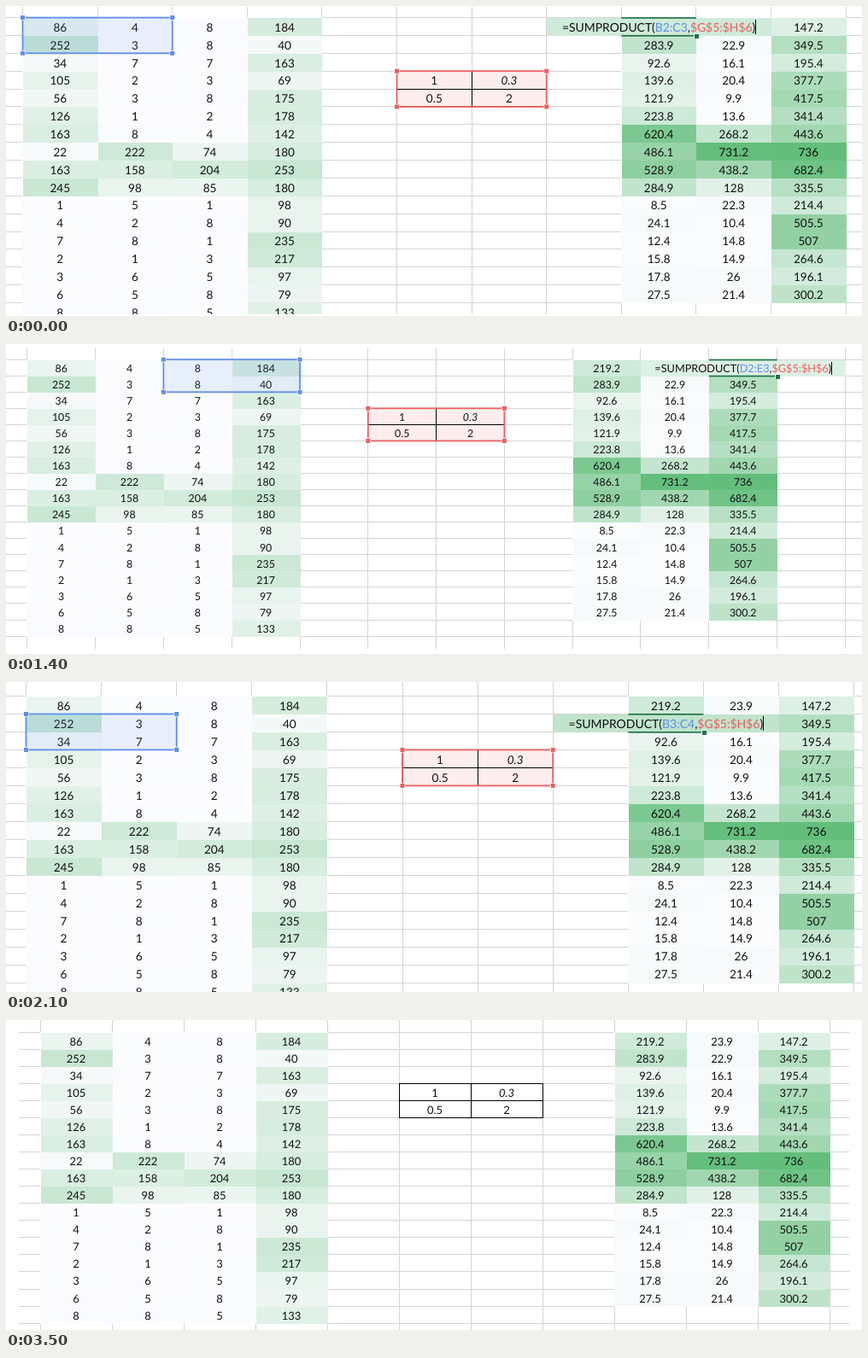
An HTML page with a canvas for the animation above (4.2 s loop, 1002 by 363 pixels).

```html
<!DOCTYPE html>
<html lang="en">
<head>
<meta charset="utf-8">
<title>Sliding SUMPRODUCT</title>
<style>
html, body { margin: 0; width: 100%; height: 100%; overflow: hidden; background: #fff; }
canvas { display: block; }
</style>
</head>
<body>
<canvas id="stage" width="1002" height="363"></canvas>
<script>
const ctx = document.getElementById('stage').getContext('2d');
const W = 1002, H = 363, STEP = 700;
const BLUE = '#5f8ced', RED = '#eb5e60', GREEN = '#217346', INK = '#111', GRID = '#d4d4d4';
const FONT = 'Lato, Carlito, sans-serif';

const columns = [
  [86, 252, 34, 105, 56, 126, 163, 22, 163, 245, 1, 4, 7, 2, 3, 6, 8],
  [4, 3, 7, 2, 3, 1, 8, 222, 158, 98, 5, 2, 8, 1, 6, 5, 8],
  [8, 8, 7, 3, 8, 2, 4, 74, 204, 85, 1, 8, 1, 3, 5, 8, 5],
  [184, 40, 163, 69, 175, 178, 142, 180, 253, 180, 98, 90, 235, 217, 97, 79, 133]
];
const kernel = [[1, 0.3], [0.5, 2]];
const KX = 5, KY = 3, OUT = 8;   // grid positions of the kernel and the results

// Grid origin, cell size and visible area of each step
const views = [
  { x: 19.5, y: 13.6, w: 87.6, h: 20.87, clip: [0, 1, W, 361] },
  { x: 19, y: 12.4, w: 87.15, h: 20.78, clip: [0, 1, W, 362] },
  { x: 24.8, y: 18.2, w: 79.8, h: 19.05, clip: [0, 5, W, 357] },
  { x: 23.5, y: 16.5, w: 88.1, h: 20.98, clip: [0, 0, W, H] },
  { x: 50.6, y: 13.5, w: 82.2, h: 19.58, clip: [28, 0, 974, H], bars: '#000' },
  { x: 40, y: 14.7, w: 84, h: 20.02, clip: [15, 0, 987, H] }
];

function convolve(c, r) {
  let sum = 0;
  kernel.forEach((row, j) => row.forEach((k, i) => sum += k * columns[c + i][r + j]));
  return Math.round(sum * 10) / 10;
}

function shade(v) {
  const t = v / 736;
  const mix = (a, b) => Math.round(a + (b - a) * t);
  return `rgb(${mix(252, 99)},${mix(252, 190)},${mix(255, 123)})`;
}

function draw(step) {
  const v = views[step];
  const gx = c => v.x + c * v.w;
  const gy = r => v.y + r * v.h;
  // First pixel after the grid line
  const px = c => Math.floor(gx(c)) + 1;
  const py = r => Math.floor(gy(r)) + 1;
  const base = r => gy(r + 0.775);

  function rect(x0, y0, x1, y1, color) {
    ctx.fillStyle = color;
    ctx.fillRect(x0, y0, x1 - x0, y1 - y0);
  }
  const fill = (c, r, cols, rows, color, edge = 0) =>
    rect(px(c) - edge, py(r) - edge, px(c + cols), py(r + rows), color);
  const hline = (c0, c1, r, color) => rect(px(c0) - 1, py(r) - 1, px(c1), py(r), color);
  const vline = (c, r0, r1, color) => rect(px(c) - 1, py(r0) - 1, px(c), py(r1), color);

  function label(text, c, r, style = '') {
    ctx.font = `${style} ${v.h * 0.65}px ${FONT}`;
    ctx.textAlign = 'center';
    ctx.fillStyle = INK;
    ctx.fillText(text, gx(c + 0.5), base(r));
  }

  function cell(value, c, r) {
    fill(c, r, 1, 1, shade(value));
    label(value, c, r);
  }

  function range(c, r, color) {
    ctx.strokeStyle = color;
    ctx.lineWidth = 1.8;
    ctx.strokeRect(gx(c), gy(r), 2 * v.w, 2 * v.h);
    for (const x of [gx(c), gx(c + 2)])
      for (const y of [gy(r), gy(r + 2)]) {
        rect(x - 3.2, y - 3.2, x + 3.2, y + 3.2, '#fff');
        rect(x - 2.5, y - 2.5, x + 2.5, y + 2.5, color);
      }
  }

  function editor(c, r) {
    const col = OUT + c, name = i => 'BCDE'[i];
    fill(col - 1, r, 3, 1, shade(convolve(c, r)));
    for (const y of [gy(r), gy(r + 1)])
      rect(gx(col), y - 0.5, gx(col + 1), y + 1.2, GREEN);
    const hx = px(col + 1), hy = py(r + 1);
    rect(hx - 3, hy - 3, hx + 3, hy + 3, '#fff');
    rect(hx - 2, hy - 2, hx + 3, hy + 3, GREEN);

    const parts = [
      ['=SUMPRODUCT(', INK],
      [`${name(c)}${r + 2}:${name(c + 1)}${r + 3}`, BLUE],
      [',', INK],
      ['$G$5:$H$6', RED],
      [')', INK]
    ];
    ctx.font = `${v.h * 0.667}px ${FONT}`;
    ctx.textAlign = 'left';
    const widths = parts.map(p => ctx.measureText(p[0]).width);
    let x = gx(col + 0.5) - widths.reduce((a, b) => a + b) / 2;
    parts.forEach(([text, color], i) => {
      ctx.fillStyle = color;
      ctx.fillText(text, x, base(r));
      x += widths[i];
    });
    rect(Math.round(x), py(r) + 2, Math.round(x) + 1, py(r + 1) - 2, '#000');
  }

  rect(0, 0, W, H, v.bars || '#fff');
  ctx.save();
  const [l, t, right, b] = v.clip;
  ctx.beginPath();
  ctx.rect(l, t, right - l, b - t);
  ctx.clip();
  rect(0, 0, W, H, '#fff');

  for (let c = 0; c < 13; c++) vline(c, -1, 19, GRID);
  for (let r = 0; r < 19; r++) hline(-1, 13, r, GRID);

  fill(0, 0, 4, 17, shade(0), 1);
  fill(OUT, 0, 3, 16, shade(0), 1);
  columns.forEach((list, c) => list.forEach((n, r) => cell(n, c, r)));
  for (let c = 0; c < 3; c++)
    for (let r = 0; r < 16; r++) cell(convolve(c, r), OUT + c, r);

  const editing = step < 5;
  fill(KX, KY, 2, 2, editing ? '#fdeeed' : '#fff');
  for (let i = 0; i < 3; i++) {
    hline(KX, KX + 2, KY + i, '#000');
    vline(KX + i, KY, KY + 2, '#000');
  }
  kernel.forEach((row, j) => row.forEach((k, i) =>
    label(k, KX + i, KY + j, k === 0.3 ? 'italic' : '')));

  if (editing) {
    const c = step % 3, r = Math.floor(step / 3);
    range(KX, KY, RED);
    fill(c, r, 2, 2, 'rgba(95,140,237,0.12)');
    range(c, r, BLUE);
    editor(c, r);
  }
  ctx.restore();
}

ctx.textRendering = 'geometricPrecision';
function tick() {
  draw(Math.floor(performance.now() / STEP) % views.length);
  requestAnimationFrame(tick);
}
tick();
</script>
</body>
</html>
```
